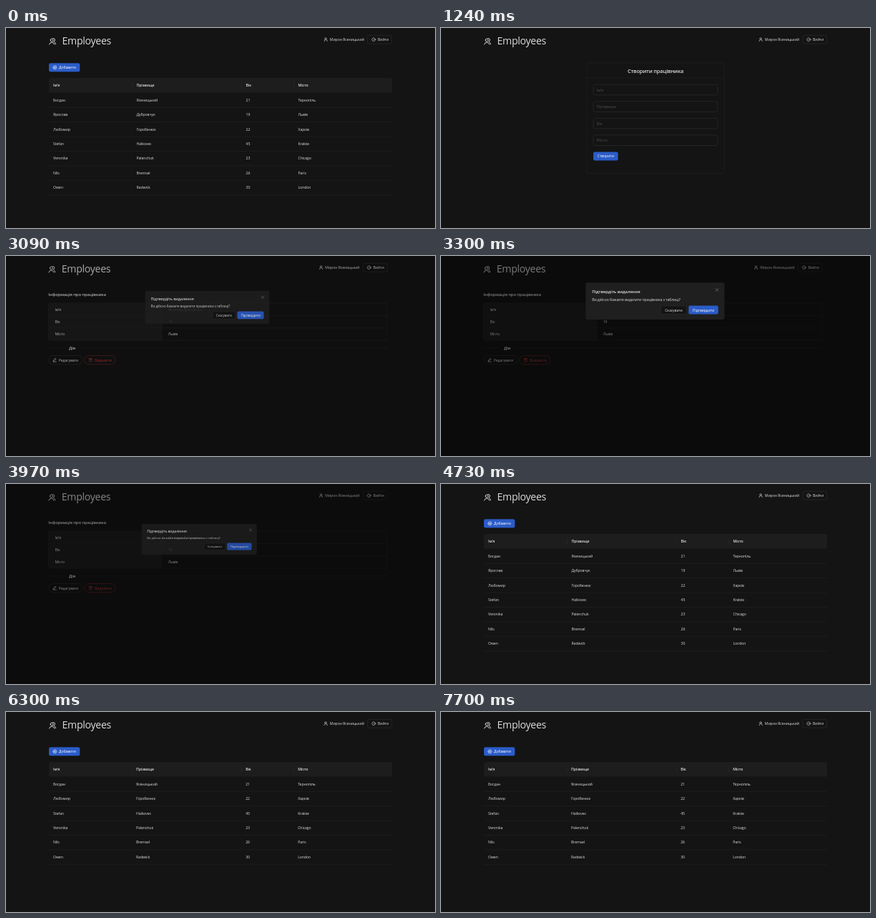
Animation, 600 px wide and 280 px high, one loop 7.73 s. Source, as an HTML page:

```html
<!DOCTYPE html>
<html lang="uk">
<head>
<meta charset="utf-8">
<title>Employees</title>
<style>
html, body { margin: 0; width: 100%; height: 100%; overflow: hidden; background: #141414; }
svg { display: block; width: 600px; height: 280px; }
text { font-family: "Open Sans", "Noto Sans", sans-serif; letter-spacing: -0.02em; fill: #dcdcdc; }
.icon { fill: none; stroke: #dcdcdc; stroke-width: .6; stroke-linecap: round; stroke-linejoin: round; }
</style>
</head>
<body>
<svg id="stage" viewBox="0 0 600 280"></svg>
<script>
const LOOP = 7730;
const BLUE = '#2b5cc8', PANEL = '#1d1d1d', LINE = '#212121', EDGE = '#303030', RED = '#b0383c';
const SMALL = 5.2, MID = 5.94;

const text = (x, y, str, { size = SMALL, weight = 400, fill = '#dcdcdc', anchor = 'start' } = {}) =>
  `<text x="${x}" y="${y + size * .36}" font-size="${size}" font-weight="${weight}" text-anchor="${anchor}" style="fill:${fill}">${str}</text>`;
const box = (x, y, w, h, fill = 'none', stroke = 'none', r = 0) =>
  `<rect x="${x}" y="${y}" width="${w}" height="${h}" rx="${r}" fill="${fill}" stroke="${stroke}" stroke-width=".6"/>`;
const line = (x1, y1, x2, y2, color = LINE) =>
  `<path d="M${x1} ${y1}L${x2} ${y2}" stroke="${color}" stroke-width=".7"/>`;
const icon = (x, y, d, color = '#dcdcdc', width = .6) =>
  `<path class="icon" transform="translate(${x} ${y})" d="${d}" style="stroke:${color};stroke-width:${width}"/>`;
const circle = r => `M${-r} 0a${r} ${r} 0 1 1 ${2 * r} 0a${r} ${r} 0 1 1 ${-2 * r} 0`;

const ICONS = {
  team: 'M-2.7 -1.7a2 2 0 1 1 4 0a2 2 0 1 1 -4 0M-4.3 4.3a3.7 3.7 0 0 1 7.2 0M1 -4.1a2.1 2.1 0 0 1 1.1 4.1M2.6 .6a4 4 0 0 1 2 3.4',
  user: 'M-1.3 -1.2a1.3 1.3 0 1 1 2.6 0a1.3 1.3 0 1 1 -2.6 0M-2.2 2.4a2.2 2.2 0 0 1 4.4 0',
  exit: 'M1.7 -1.6a2.35 2.35 0 1 0 0 3.2M0 0H2.8M2 -.8L2.8 0L2 .8',
  plus: circle(2.5) + 'M-1.2 0H1.2M0 -1.2V1.2',
  edit: 'M-1.9 1.4L-1.5 -.1L1 -2.4L2 -1.4L-.5 1Z M-2.3 2.5H2.3',
  trash: 'M-2.3 -1.4H2.3M-.9 -1.4V-2.3H.9V-1.4M-1.7 -1.4L-1.4 2.4H1.4L1.7 -1.4',
  close: 'M-1.9 -1.9L1.9 1.9M1.9 -1.9L-1.9 1.9'
};

const PEOPLE = [
  ['Богдан', 'Ясеницький', 21, 'Тернопіль'],
  ['Ярослав', 'Дубровчук', 19, 'Львів'],
  ['Любомир', 'Горобенюк', 22, 'Харків'],
  ['Stefan', 'Halkovec', 45, 'Krakiw'],
  ['Veronika', 'Palenchuk', 23, 'Chicago'],
  ['Nils', 'Bremsel', 26, 'Paris'],
  ['Owen', 'Radwick', 30, 'London']
];

// left and right are the edges of the page's content column
function header(left, right) {
  return icon(left + 4.8, 18.7, ICONS.team, '#dcdcdc', .95)
    + text(left + 18.5, 18.2, 'Employees', { size: 14.1, weight: 500 })
    + icon(right - 92.8, 16.2, ICONS.user)
    + text(right - 87.2, 16.3, 'Мирон Ясеницький')
    + box(right - 34.3, 10.3, 34, 11.8, 'none', EDGE, 2.2)
    + icon(right - 25.8, 16.2, ICONS.exit)
    + text(right - 20, 16.3, 'Вийти');
}

function list(people, cols) {
  const step = 20.43;
  const row = (cells, y, weight) => cells.map((c, i) => text(cols[i], y, c, { weight })).join('');
  return box(60, 49.3, 43.3, 12, BLUE, 'none', 2.2)
    + icon(68.3, 55.3, ICONS.plus, '#fff')
    + text(74, 55.3, 'Добавити', { fill: '#fff' })
    + `<path d="M60 90.6V73a3 3 0 0 1 3 -3H537a3 3 0 0 1 3 3V90.6Z" fill="${PANEL}"/>`
    + row(['Ім’я', 'Прізвище', 'Вік', 'Місто'], 80.6, 600)
    + cols.slice(1).map(x => line(x - 6, 76.3, x - 6, 84.7, '#2a2a2a')).join('')
    + people.map((p, i) => row(p, 100.9 + step * i, 400)
      + line(60, 111.1 + step * i, 540, 111.1 + step * i)).join('');
}

function form() {
  const fields = ['Ім’я', 'Прізвище', 'Вік', 'Місто'];
  return box(203.7, 48.9, 192.6, 154.8, 'none', '#222', 3)
    + line(203.7, 70, 396.3, 70)
    + text(300, 60.3, 'Створити працівника', { size: 7.4, weight: 600, anchor: 'middle' })
    + fields.map((f, i) => box(213, 79.2 + 23.55 * i, 174, 14.6, 'none', EDGE, 2.6)
      + text(217.6, 86.6 + 23.55 * i, f, { size: MID, fill: '#4c4c4c' })).join('')
    + box(213, 173.5, 34.6, 12, BLUE, 'none', 2.2)
    + text(230.3, 179.6, 'Створити', { fill: '#fff', anchor: 'middle' });
}

function details(left, right) {
  const w = right - left, split = left + w / 3 + .5, rowH = 17.37;
  const rows = [['Ім’я', 'Ярослав Дубровчук'], ['Вік', '19'], ['Місто', 'Львів']];
  return text(left, 54, 'Інформація про працівника', { size: MID, weight: 600 })
    + box(left, 66, split - left, 52.1, PANEL, 'none', 2)
    + rows.map(([k, v], i) => text(left + 9.2, 74.8 + rowH * i, k)
      + text(split + 8.8, 74.8 + rowH * i, v)
      + (i ? line(left, 66 + rowH * i, right, 66 + rowH * i, '#242424') : '')).join('')
    + line(split, 66, split, 118, '#242424')
    + box(left + .2, 66, w - .4, 52.1, 'none', '#262626', 2.6)
    + line(left, 128.7, left + w * .05, 128.7) + line(left + 43, 128.7, right, 128.7)
    + text(left + 28.7, 128.7, 'Дія', { size: MID, weight: 600 })
    + box(left + .3, 139.5, 47, 12.2, 'none', EDGE, 6.1)
    + icon(left + 8.8, 145.6, ICONS.edit)
    + text(left + 14.5, 145.7, 'Редагувати')
    + box(left + 50.3, 139.5, 43.2, 12.2, 'none', '#74282b', 6.1)
    + icon(left + 59, 145.6, ICONS.trash, RED)
    + text(left + 64.8, 145.7, 'Видалити', { fill: RED });
}

function modal() {
  return box(202.3, 37.3, 194.2, 51.7, '#1f1f1f', 'none', 3)
    + text(211.2, 49.6, 'Підтвердіть видалення', { size: MID, weight: 600 })
    + icon(386, 47.5, ICONS.close, '#8c8c8c')
    + text(211.2, 61.4, 'Ви дійсно бажаєте видалити працівника з таблиці?')
    + box(307.6, 69.8, 35.7, 11.6, '#141414', EDGE, 2.2)
    + text(325.4, 75.7, 'Скасувати', { anchor: 'middle' })
    + box(346.3, 69.5, 41.4, 12, BLUE, 'none', 2.2)
    + text(367, 75.7, 'Підтвердити', { fill: '#fff', anchor: 'middle' });
}

const WIDE = [60, 540], LOCKED = [59.3, 533.5];
const views = {
  list: header(...WIDE) + list(PEOPLE, [66, 182.5, 335.6, 408.5]),
  form: header(...WIDE) + form(),
  details: header(...WIDE) + details(...WIDE),
  locked: header(...LOCKED) + details(...LOCKED),
  short: header(...WIDE) + list(PEOPLE.filter((_, i) => i !== 1), [66, 182, 335.2, 408.2])
};
const TIMELINE = [
  [0, 'list'], [1000, 'form'], [1620, 'list'], [1880, 'details'],
  [2990, 'locked'], [4150, 'details'], [4290, 'list'], [5960, 'short']
];
const OPEN = 2990, CLOSE = 3889, FADE = 200;

const stage = document.getElementById('stage');
stage.innerHTML = box(0, 0, 600, 280, '#141414')
  + Object.entries(views).map(([id, body]) => `<g id="${id}">${body}</g>`).join('')
  + `<rect id="mask" width="600" height="280"/><g id="modal">${modal()}</g>`;
const el = id => document.getElementById(id);
const mask = el('mask'), dialog = el('modal');

const part = (t, start) => Math.min(1, Math.max(0, (t - start) / FADE));
const outCirc = p => Math.sqrt(1 - (1 - p) ** 2);
const inOutCirc = p => p < .5
  ? (1 - Math.sqrt(1 - 4 * p * p)) / 2
  : (1 + Math.sqrt(1 - (2 - 2 * p) ** 2)) / 2;

function draw() {
  const t = performance.now() % LOOP;
  const current = TIMELINE.filter(([start]) => start <= t).pop()[1];
  for (const id in views) el(id).style.display = id === current ? '' : 'none';

  mask.setAttribute('opacity', .45 * (part(t, OPEN) - part(t, CLOSE + 60)));
  const shown = t < CLOSE ? outCirc(part(t, OPEN)) : 1 - inOutCirc(part(t, CLOSE));
  const scale = .2 + .8 * shown;
  dialog.setAttribute('opacity', shown);
  dialog.setAttribute('transform', `translate(129 146) scale(${scale}) translate(-129 -146)`);
  requestAnimationFrame(draw);
}
draw();
</script>
</body>
</html>
```
